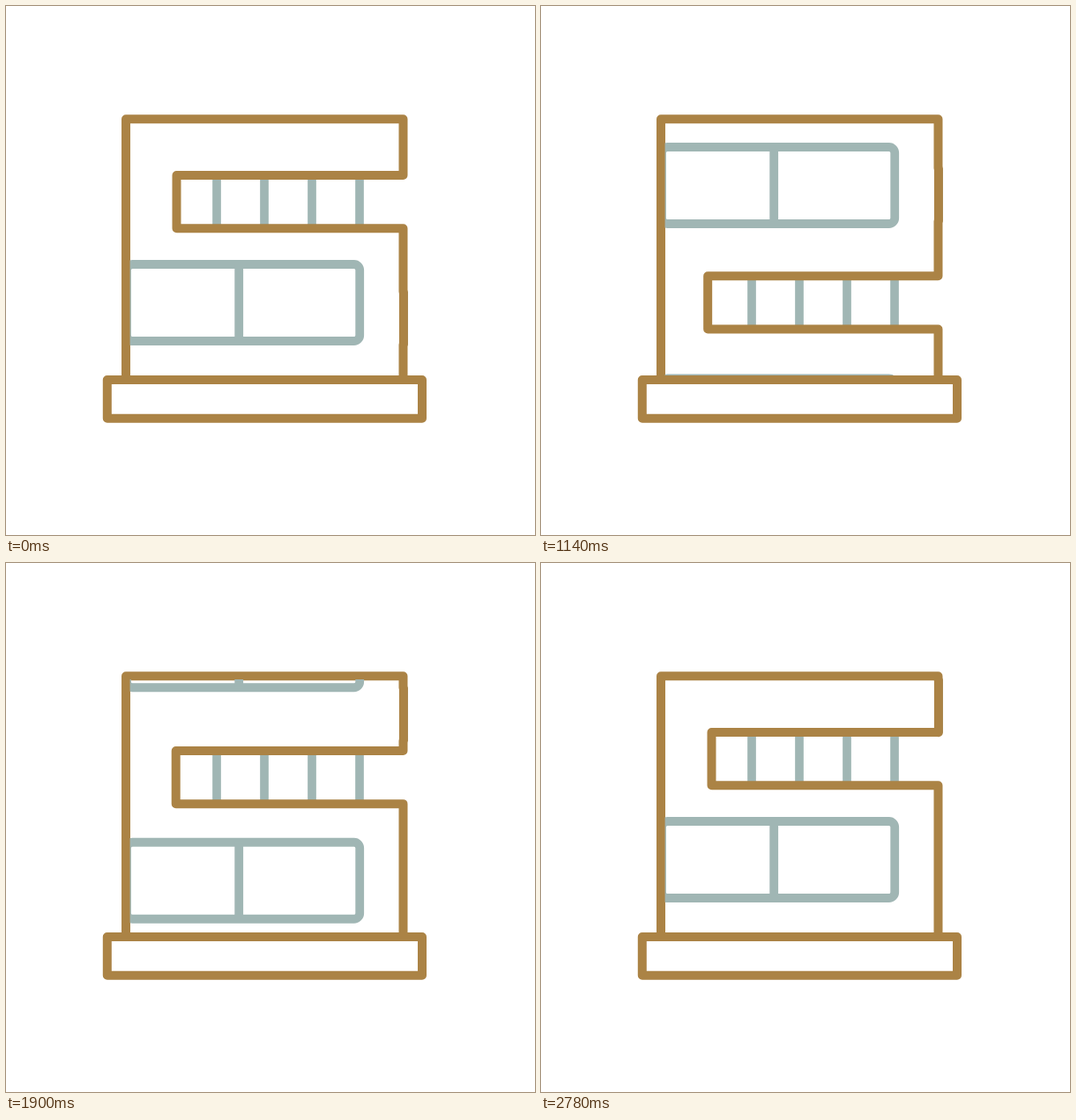
These frames come from a looping animation (600x600 px, 2800 ms). An HTML page with a canvas:

```html
<!DOCTYPE html>
<html lang="en">
<head>
<meta charset="utf-8">
<title>Building loop</title>
<style>
  html, body { margin: 0; width: 100%; height: 100%; overflow: hidden; background: #fff; }
  canvas { display: block; width: 600px; height: 600px; }
</style>
</head>
<body>
<canvas id="stage"></canvas>
<script>
const SIZE = 600, LOOP = 2800, SWAP = 1000;
const BROWN = '#ab8345', TEAL = '#a0b6b4';
const LEFT = 136, RIGHT = 450.5, TOP = 128.3, FLOOR = 424;
const NOTCH_H = 60.2, SHUT = 450.9;
const BAR_X = [239, 293, 347, 401];
const BOX_Y = 293, BOX_H = 87, BOX_STEP = 262.5;

const canvas = document.getElementById('stage');
const ctx = canvas.getContext('2d');
const ratio = window.devicePixelRatio || 1;
canvas.width = canvas.height = SIZE * ratio;

const lerp = (a, b, k) => a + (b - a) * k;
const clamp = v => Math.min(1, Math.max(0, v));

function bezier(x1, y1, x2, y2) {
  const at = (a, b, s) => 3 * (1 - s) * (1 - s) * s * a + 3 * (1 - s) * s * s * b + s * s * s;
  return u => {
    if (u <= 0 || u >= 1) return clamp(u);
    let lo = 0, hi = 1;
    for (let i = 0; i < 30; i++) {
      const mid = (lo + hi) / 2;
      if (at(x1, x2, mid) < u) lo = mid; else hi = mid;
    }
    return at(y1, y2, lo);
  };
}

const swapEase = bezier(0.898, 0, 0.42, 1);
const riseEase = bezier(0.167, 0.167, 0.215, 1);

function line(x1, y1, x2, y2) {
  ctx.beginPath();
  ctx.moveTo(x1, y1);
  ctx.lineTo(x2, y2);
  ctx.stroke();
}

// open: 0 = flush with the wall, 1 = fully cut in
function drawBars({ y, open }) {
  for (const bx of BAR_X) {
    const x = lerp(451, bx, open);
    line(x, y, x, y + NOTCH_H);
  }
}

function drawWalls(notches) {
  ctx.beginPath();
  ctx.moveTo(LEFT, FLOOR);
  ctx.lineTo(LEFT, TOP);
  ctx.lineTo(RIGHT, TOP);
  for (const { x, y } of notches) {
    ctx.lineTo(RIGHT, y);
    ctx.lineTo(x, y);
    ctx.lineTo(x, y + NOTCH_H);
    ctx.lineTo(RIGHT, y + NOTCH_H);
  }
  ctx.lineTo(RIGHT, FLOOR);
  ctx.stroke();
}

function drawBox(y) {
  const x = 137, w = 264.2, r = 6.5;
  ctx.beginPath();
  ctx.moveTo(x + r, y);
  ctx.arcTo(x + w, y, x + w, y + BOX_H, r);
  ctx.arcTo(x + w, y + BOX_H, x, y + BOX_H, r);
  ctx.arcTo(x, y + BOX_H, x, y, r);
  ctx.arcTo(x, y, x + w, y, r);
  ctx.closePath();
  ctx.stroke();
  line(264.2, y, 264.2, y + BOX_H);
}

function draw(t) {
  const swap = swapEase(clamp(t / SWAP));
  const rise = riseEase(clamp((t - SWAP) / (LOOP - SWAP)));

  const upper = { x: lerp(193.5, SHUT, swap), y: lerp(192, 132, rise), open: 1 - swap };
  const lower = {
    x: lerp(SHUT, lerp(188.5, 193.5, rise), swap),
    y: lerp(324, 192, rise),
    open: swap
  };
  const notches = [upper, lower];
  const boxY = BOX_Y - 113 * swap - (BOX_STEP - 113) * rise;

  ctx.setTransform(ratio, 0, 0, ratio, 0, 0);
  ctx.fillStyle = '#fff';
  ctx.fillRect(0, 0, SIZE, SIZE);
  ctx.lineJoin = 'round';
  ctx.lineCap = 'butt';

  ctx.strokeStyle = TEAL;
  ctx.lineWidth = 9.7;
  notches.forEach(drawBars);

  ctx.strokeStyle = BROWN;
  ctx.lineWidth = 10;
  drawWalls(notches);

  ctx.save();
  ctx.beginPath();
  ctx.rect(140.6, 132, 310, 288);
  ctx.clip();
  ctx.strokeStyle = TEAL;
  ctx.lineWidth = 9.8;
  drawBox(boxY);
  drawBox(boxY + BOX_STEP);
  ctx.restore();

  ctx.strokeStyle = BROWN;
  ctx.lineWidth = 10;
  ctx.strokeRect(114.8, FLOOR, 357.2, 43.8);
}

const start = performance.now();
function frame() {
  draw((performance.now() - start) % LOOP);
  requestAnimationFrame(frame);
}
frame();
</script>
</body>
</html>
```
